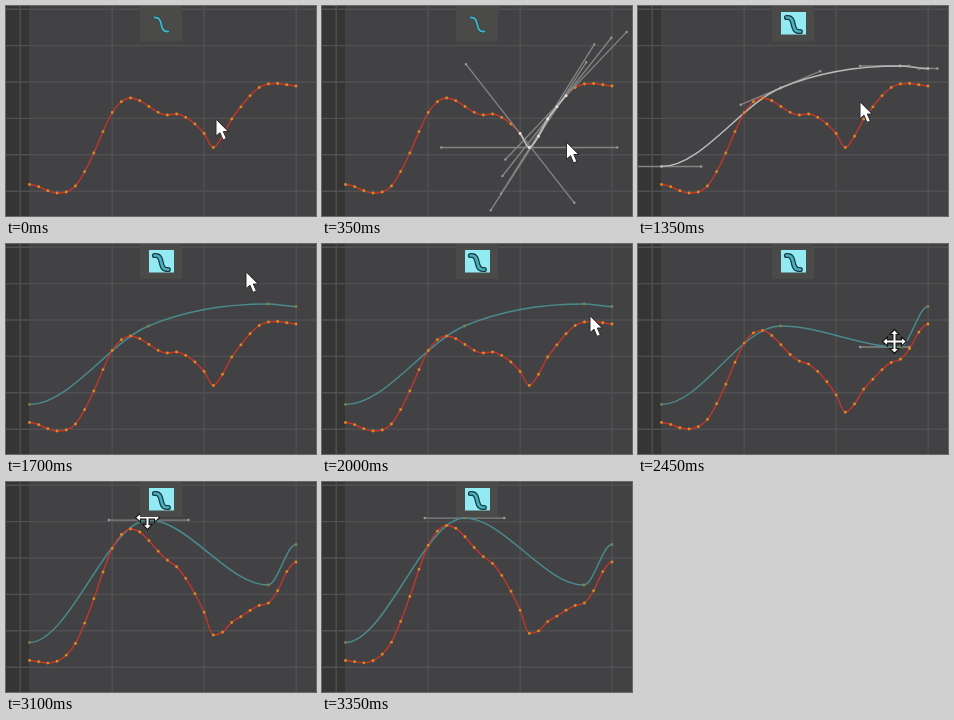
An HTML page for the animation above (3.85 s loop, 310x210 px).

```html
<!DOCTYPE html>
<html lang="en">
<head>
<meta charset="utf-8">
<title>Layered curve editing</title>
<style>
html, body { margin: 0; width: 100%; height: 100%; overflow: hidden; background: #424244; }
svg { display: block; width: 100vw; height: 100vh; }
path { fill: none; stroke-linecap: round; }
#arrow, #mover { fill: #fff; }
</style>
</head>
<body>
<svg viewBox="0 0 310 210">
  <rect width="310" height="210" fill="#424244"/>
  <rect width="23" height="210" fill="#353533"/>
  <path id="grid" stroke="#505052" stroke-width="1.4"/>
  <g id="layer">
    <path id="layerHandles" stroke="#828282" stroke-width="1.3"/>
    <path id="layerLine" stroke-width="1.5"/>
    <path id="layerTips" stroke="#989898" stroke-width="2.6"/>
    <path id="layerKeys" stroke-width="2.8"/>
  </g>
  <path id="resultLine" stroke="#c4352a" stroke-width="1.4"/>
  <path id="resultKeys" stroke="#da8a22" stroke-width="2.9"/>
  <g id="picked">
    <path id="pickedHandles" stroke="#828282" stroke-width="1.4"/>
    <path id="pickedTips" stroke="#989898" stroke-width="2.4"/>
    <path id="pickedLine" stroke="#bcbcbc" stroke-width="1.6"/>
    <path id="pickedKeys" stroke="#e4e4e4" stroke-width="2.8"/>
  </g>
  <g id="cursor">
    <path id="arrow" d="M0 0V16.6L4 13.2L7 20.4L10.4 19L7.3 12H12Z" stroke="#2a2a2a"/>
    <path id="mover" d="M0 -12L4.6 -7H1.6V-1.6H7V-4.6L12 0L7 4.6V1.6H1.6V7H4.6L0 12L-4.6 7H-1.6V1.6H-7V4.6L-12 0L-7 -4.6V-1.6H-1.6V-7H-4.6Z" stroke="#181818" stroke-width="1.2"/>
  </g>
  <rect x="134" width="42" height="35" fill="#4a4a48"/>
  <rect id="lit" x="143" y="6" width="25" height="22.5" fill="#92ebf3"/>
  <path id="glyphEdge" d="M148.5 11.5H150C157.5 11.5 153 25.5 160.5 25.5H162.3" stroke="#26363a"/>
  <path id="glyph" d="M148.5 11.5H150C157.5 11.5 153 25.5 160.5 25.5H162.3" stroke="#3fb4c6" stroke-width="1.9"/>
</svg>
<script>
const LOOP = 3850, STEP = 50, LAG = 40;
const $ = id => document.getElementById(id);
const set = (id, name, value) => $(id).setAttribute(name, value);
const clamp = v => Math.max(0, Math.min(1, v));
const at = (x, y) => x.toFixed(2) + " " + y.toFixed(2);
const dots = pts => pts.map(p => "M" + at(p.x, p.y) + "h.01").join("");

// Auto-clamped tangent: flat at ends and extremes.
function slope(pts, i) {
  const a = pts[i - 1], p = pts[i], b = pts[i + 1];
  if (!a || !b || (p.y - a.y) * (b.y - p.y) <= 0) return 0;
  const rise = (q, r) => (r.y - q.y) / (r.x - q.x);
  const m = rise(a, b);
  return Math.sign(m) * Math.min(Math.abs(m), 3 * Math.abs(rise(a, p)), 3 * Math.abs(rise(p, b)));
}

function valueAt(pts, x) {
  let i = 0;
  while (i < pts.length - 2 && x > pts[i + 1].x) i++;
  const a = pts[i], b = pts[i + 1], h = b.x - a.x;
  const u = clamp((x - a.x) / h), v = 1 - u;
  const ya = a.y + slope(pts, i) * h / 3, yb = b.y - slope(pts, i + 1) * h / 3;
  return v * v * v * a.y + 3 * v * v * u * ya + 3 * v * u * u * yb + u * u * u * b.y;
}

// Shape of the sampled curve: sample index and height.
const shape = [[0, 178.5], [3, 187], [5, 180], [7, 147], [9, 106.5], [11, 92], [15, 109], [16, 108],
  [18, 118], [19, 127.5], [20, 141.5], [22, 113], [25, 81.5], [27, 77.5], [29, 80]]
  .map(([x, y]) => ({ x, y }));
const start = Array.from({ length: 30 }, (_, i) => ({ x: 23.5 + i * 9.19, y: valueAt(shape, i) }));

// Dragged heights of the two middle layer keys.
const dropY = t => 60 + 43 * clamp((t - 2150) / 300);
const liftY = t => 36 + 46 * Math.exp(-Math.max(0, t - 2900) / 65);
const layerAt = t => [
  { x: 23.5, y: 160.5 },
  { x: 142.5, y: liftY(t) },
  { x: 262, y: dropY(t) },
  { x: 290, y: 62.5 }
];

// Arrow paths as [time, x, y] stops; each shows from its first to its last time.
const paths = [
  [[0, 210, 113.5], [100, 198, 75], [200, 198, 75], [350, 244.5, 136.5], [450, 248, 145], [650, 248, 145]],
  [[1350, 222, 96], [1600, 240, 28], [1700, 240, 28], [2000, 268, 72], [2100, 259, 60]],
  [[2500, 256, 97], [2850, 142, 80]]
];

function along(stops, t) {
  const i = Math.max(1, stops.findIndex(s => t < s[0]));
  const [t0, x0, y0] = stops[i - 1], [t1, x1, y1] = stops[i];
  const u = clamp((t - t0) / (t1 - t0));
  return { x: x0 + (x1 - x0) * u, y: y0 + (y1 - y0) * u };
}

function curve(pts, keep = () => true) {
  let d = "";
  for (let i = 1; i < pts.length; i++) {
    const a = pts[i - 1], b = pts[i], h = (b.x - a.x) / 3;
    if (!keep(a) || !keep(b)) continue;
    d += "M" + at(a.x, a.y) + "C" + at(a.x + h, a.y + slope(pts, i - 1) * h) + " " +
      at(b.x - h, b.y - slope(pts, i) * h) + " " + at(b.x, b.y);
  }
  return d;
}

function handle(pts, i, left, right) {
  const p = pts[i], m = slope(pts, i);
  return [{ x: p.x - left, y: p.y - m * left }, { x: p.x + right, y: p.y + m * right }];
}

function drawHandles(id, ends) {
  set(id + "Handles", "d", ends.map(([a, b]) => "M" + at(a.x, a.y) + "L" + at(b.x, b.y)).join(""));
  set(id + "Tips", "d", dots(ends.flat()));
}

function drawLayer(t) {
  const pts = layerAt(t), all = t < 1650;
  const active = i => all || (t >= 2100 && i === (t < 2850 ? 2 : 1));
  const third = (a, b) => a && b ? (b.x - a.x) / 3 : 0;
  const ends = [];
  pts.forEach((p, i) => {
    if (!active(i)) return;
    const left = third(pts[i - 1], p), right = third(p, pts[i + 1]);
    ends.push(handle(pts, i, left || right, right || left));
  });
  set("layerLine", "d", curve(pts));
  set("layerLine", "stroke", all ? "#bababa" : "#498a8d");
  set("layerKeys", "d", dots(pts));
  set("layerKeys", "stroke", all ? "#b0b0b0" : "#82804a");
  drawHandles("layer", ends);
}

function drawResult(t) {
  const from = layerAt(0), now = layerAt(t - LAG);
  const pts = start.map(p => ({ x: p.x, y: p.y + valueAt(now, p.x) - valueAt(from, p.x) }));
  set("resultLine", "d", curve(pts));
  set("resultKeys", "d", dots(pts));
}

function drawPicked(t) {
  const edge = along(paths[0], Math.min(t, 649)).x;
  const inside = p => t >= 250 && p.x > 197 && p.x <= edge;
  const ends = [];
  start.forEach((p, i) => {
    if (!inside(p)) return;
    const reach = 88 / Math.hypot(1, slope(start, i));
    ends.push(handle(start, i, reach, reach));
  });
  drawHandles("picked", ends);
  set("pickedLine", "d", curve(start, inside));
  set("pickedKeys", "d", dots(start.filter(inside)));
}

function drawCursor(t) {
  const path = paths.find(p => t >= p[0][0] && t < p[p.length - 1][0]);
  const drop = t >= 2100 && t < 2500, lift = t >= 2850 && t < 3350;
  const spot = path ? along(path, t)
    : drop ? { x: 256.5, y: dropY(t) - 5.5 }
    : { x: 141.5, y: liftY(t) - 2.5 };
  set("cursor", "transform", `translate(${spot.x} ${spot.y})`);
  set("arrow", "display", path ? "inline" : "none");
  set("mover", "display", drop || lift ? "inline" : "none");
}

function draw(ms) {
  const t = Math.floor((ms % LOOP) / STEP) * STEP;
  const on = clamp((t - 800) / 350);
  drawLayer(t);
  drawResult(t);
  drawPicked(t);
  drawCursor(t);
  set("layer", "opacity", on);
  set("picked", "opacity", 1 - on);
  set("lit", "opacity", on);
  set("glyphEdge", "stroke-width", 3 + 2.2 * on);
  set("glyph", "stroke-width", 1.9 + 0.7 * on);
}

let lines = "";
for (let k = 0; k < 4; k++) lines += `M${14.2 + 92 * k} 0v210`;
for (let k = 0; k < 6; k++) lines += `M0 ${3.2 + 36.4 * k}h310`;
set("grid", "d", lines);

const begin = performance.now();
function tick() {
  draw(performance.now() - begin);
  requestAnimationFrame(tick);
}
tick();
</script>
</body>
</html>
```
